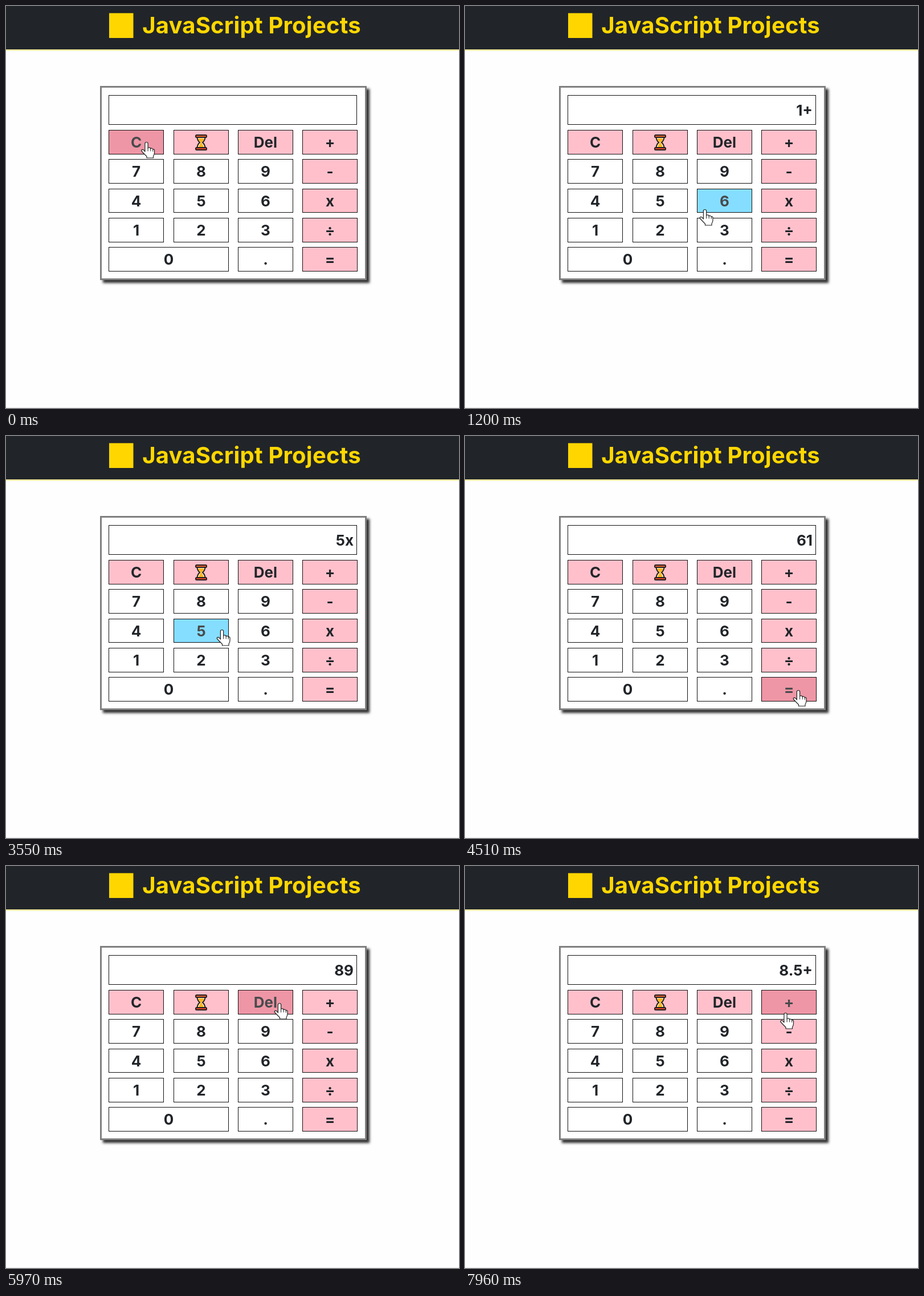
An HTML page for the animation above (7990 ms loop, 795 px wide and 704 px high).

```html
<!DOCTYPE html>
<html lang="en">
<head>
<meta charset="utf-8">
<title>Calculator</title>
<style>
html, body { margin: 0; width: 100%; height: 100%; overflow: hidden; background: #fefefe; }
svg { display: block; width: 795px; height: 704px; }
text { font: 700 26px Inter, "Open Sans", sans-serif; fill: #212529; text-anchor: middle; }
.title { font-size: 40px; fill: #ffd700; letter-spacing: .2px; }
.screen { text-anchor: end; }
.key rect { fill: #fff; stroke: #111; }
.op rect { fill: #ffc0cb; }
.on text { fill: #484a4c; }
.on rect { fill: #85deff; }
.op.on rect { fill: #ee96a6; }
</style>
</head>
<body>
<svg viewBox="0 0 795 704">
  <defs>
    <filter id="blur" x="-10%" y="-10%" width="120%" height="120%">
      <feGaussianBlur stdDeviation="2"/>
    </filter>
  </defs>
  <rect width="795" height="704" fill="#fefefe"/>
  <rect y="703" width="795" height="1" fill="#ececec"/>
  <rect y="75" width="795" height="4" fill="#fffbd6"/>
  <rect y="75.5" width="795" height="2.5" fill="#fff3a0"/>
  <rect width="795" height="76" fill="#212529"/>
  <rect x="181" y="12.5" width="42.5" height="43.5" fill="#ffd600"/>
  <text class="title" x="431" y="48">JavaScript Projects</text>

  <rect x="170" y="145" width="468" height="340" fill="#333" filter="url(#blur)"/>
  <rect x="166.5" y="141.5" width="465" height="337" fill="#fff" stroke="#808080" stroke-width="3"/>
  <rect x="180.5" y="156.5" width="435" height="51" fill="#fff" stroke="#111"/>
  <text class="screen" id="screen" x="610" y="192"></text>
  <g id="keys"></g>

  <g transform="translate(342.5 239)" stroke="#231f20" stroke-width="2" stroke-linejoin="round">
    <path d="M-7 -10Q-7 -4 -2.5 0Q-7 4 -7 10H7Q7 4 2.5 0Q7 -4 7 -10Z" fill="#fdf0d0"/>
    <path d="M-5 -7H5Q5 -4 .8 0L5 9H-5L-.8 0Q-5 -4 -5 -7Z" fill="#fcb41c" stroke="none"/>
    <rect x="-9.5" y="-13" width="19" height="4" rx="1.5" fill="#e8612f"/>
    <rect x="-9.5" y="9" width="19" height="4" rx="1.5" fill="#e0442a"/>
  </g>

  <g id="hand" fill="#fff" stroke="#222" stroke-width="1.2" stroke-linejoin="round" stroke-linecap="round">
    <path d="M-2.6 15V1Q-2.6 -1.5 0 -1.5T2.6 1V9Q3 7.5 5 7.8T7.2 10Q8 8.8 9.5 9.3T11.2 11.2Q13 10.4 14 12V17Q14 20 12 23V26H.5V23.5Q-5 18 -8.6 14Q-9.2 11.3 -6.5 11.4Q-4.5 12 -2.6 15Z"/>
    <path d="M2.6 9V14M7.2 10V14M11.2 11.5V14.5" fill="none" stroke-width="1"/>
  </g>
</svg>
<script>
const LOOP = 7990;
const $ = id => document.getElementById(id);

function make(tag, attrs, parent) {
  const el = document.createElementNS("http://www.w3.org/2000/svg", tag);
  for (const k in attrs) el.setAttribute(k, attrs[k]);
  return parent.appendChild(el);
}

// Keypad; "T" is the hourglass key, which has no label
const colX = [180.5, 294.5, 407.5, 520.5];
const rowY = [217.5, 268.5, 320.5, 371.5, 422.5];
const rows = ["C T Del +", "7 8 9 -", "4 5 6 x", "1 2 3 ÷", "0 _ . ="];
const keys = {};

rows.forEach((row, r) => row.split(" ").forEach((name, c) => {
  if (name === "_") return;
  const x = colX[c], y = rowY[r], w = name === "0" ? 210 : 96, h = r === 2 ? 41 : 42;
  const el = make("g", { class: r === 0 || c === 3 ? "key op" : "key" }, $("keys"));
  make("rect", { x, y, width: w, height: h }, el);
  make("text", { x: x + w / 2, y: y + 30.5 }, el).textContent = name === "T" ? "" : name;
  keys[name] = { el, x, y, w, h };
}));

// Pointer visits: key, arrival, departure, offset from the key's centre.
// A key is pressed halfway through its visit; "~" only passes over it.
const visits = [
  ["~C", 0, 120, 18, 1.5], ["1", 520, 830, 2, -8], ["+", 1000, 1010, 27, 5],
  ["~+", 1060, 1060, 58], ["~6", 1200, 1200, -34.5, 17], ["5", 1340, 1660, 9],
  ["=", 1920, 2250], ["~÷", 2360, 2360, -50, -11.5], ["~T", 2450, 2450, 37, -8],
  ["~C", 2570, 2570, 10, -9], ["C", 2750, 2770, 10, -9], ["5", 2960, 3120, 8, 13],
  ["x", 3300, 3400, -8], ["5", 3550, 3600, 36.5, 0], ["+", 3750, 3800, -8],
  ["6", 3930, 3980, 6], ["x", 4080, 4120, -15], ["6", 4220, 4310, 15],
  ["=", 4450, 4540, 16.5, 3.5], ["C", 4800, 4870, 4], ["8", 5020, 5060, 4, -4],
  ["9", 5140, 5380, -15, -5], ["+", 5570, 5680, -6], ["Del", 5860, 5960, 24.5, 3.5],
  ["Del", 6200, 6210, 24.5, 3.5], ["~3", 6600, 6980, 0, -8], [".", 7090, 7190, 0, -10],
  ["5", 7400, 7520, 6], ["~-", 7780, 7780, -12, -4], ["+", 7880, 7960, -6, 20.5]
];

const solve = s => String(s.split("+").reduce((sum, term) => sum + term.split("x").reduce((a, b) => a * b, 1), 0));

function press(text, key) {
  if (key === "C") return "";
  if (key === "Del") return text.slice(0, -1);
  return key === "=" ? solve(text) : text + key;
}

const stops = visits.map(([label, from, to, dx = 0, dy = 2.5]) => {
  const name = label.replace("~", ""), k = keys[name];
  return { name, from, to, x: k.x + k.w / 2 + dx, y: k.y + k.h / 2 + dy, pressed: name === label };
});

const mix = (a, b, e) => a + (b - a) * e;

function pointer(t) {
  const i = stops.findLastIndex(s => s.from <= t);
  const a = stops[i], b = stops[i + 1];
  if (!b || t <= a.to) return [a.x, a.y];
  const u = (t - a.to) / (b.from - a.to), e = u * u * (3 - 2 * u);
  return [mix(a.x, b.x, e), mix(a.y, b.y, e)];
}

function screenAt(t) {
  return stops.filter(s => s.pressed && (s.from + s.to) / 2 <= t)
    .reduce((text, s) => press(text, s.name), "");
}

function draw(t) {
  const [x, y] = pointer(t), hx = x + 2.5;
  for (const k of Object.values(keys)) {
    const on = hx >= k.x && hx <= k.x + k.w && y >= k.y && y <= k.y + k.h;
    k.el.classList.toggle("on", on);
  }
  $("hand").setAttribute("transform", `translate(${x} ${y})`);
  $("screen").textContent = screenAt(t);
}

function tick() {
  draw(performance.now() % LOOP);
  requestAnimationFrame(tick);
}
tick();
</script>
</body>
</html>
```
